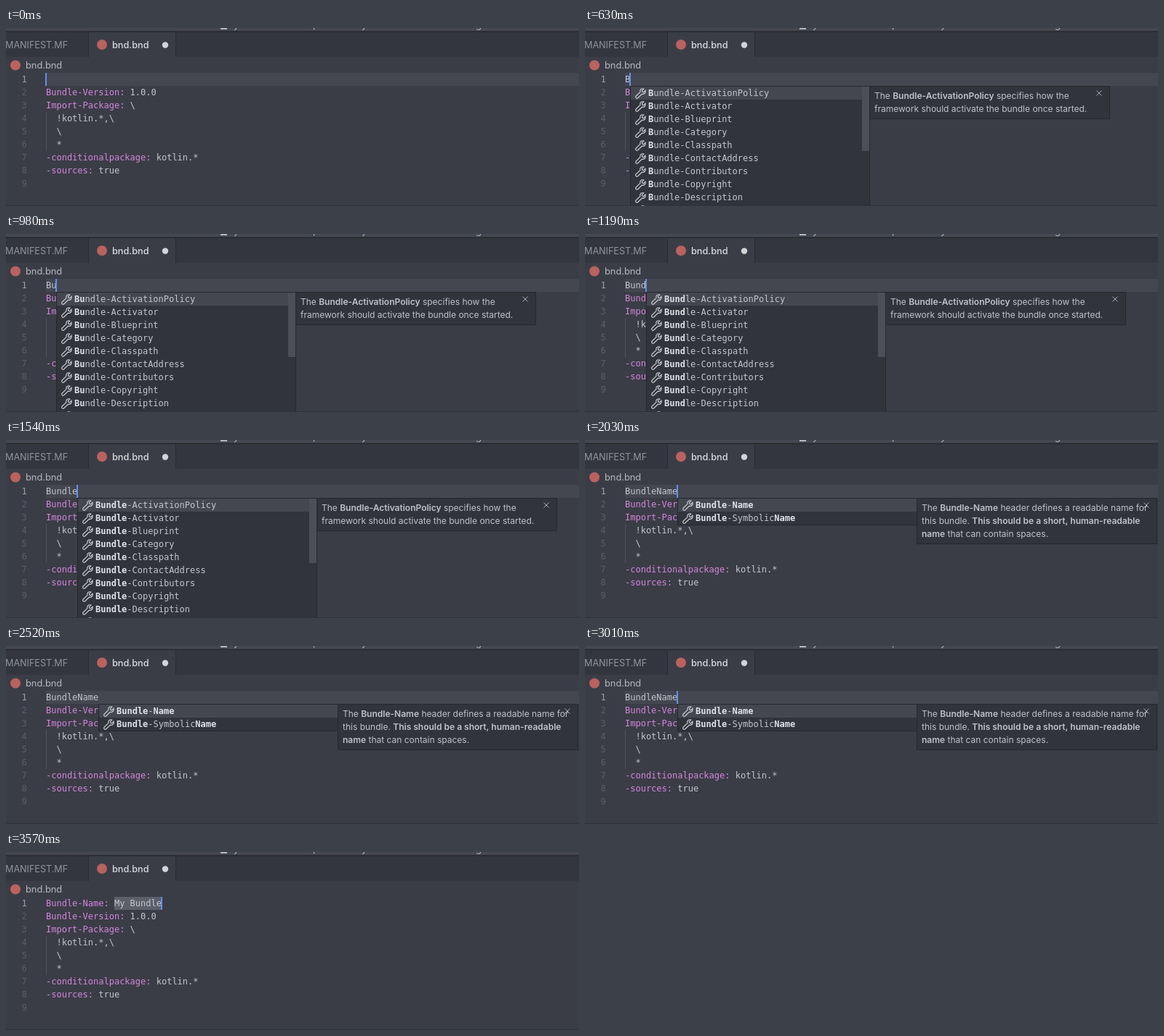
Animation of 788x246 px, one loop 3640 ms. Source, as an HTML page with a canvas:

```html
<!DOCTYPE html>
<html lang="en">
<head>
<meta charset="utf-8">
<title>Code completion</title>
<style>
html, body { margin: 0; height: 100%; overflow: hidden; background: #3b3d46; }
canvas { display: block; }
</style>
</head>
<body>
<canvas id="stage" width="788" height="246"></canvas>
<script>
const ctx = document.getElementById('stage').getContext('2d');
const LOOP = 3640, STEP = 70, ADVANCE = 7.224, LEFT = 55, ROW = 18;
const MONO = '12px "DejaVu Sans Mono", monospace';
const UI = 'Inter, Roboto, sans-serif';
const KEY = '#d486dd', TEXT = '#c3c6ce', BRIGHT = '#e0e2e7';

const WORD = 'BundleName';
const KEY_TIMES = [420, 700, 1050, 1190, 1260, 1400, 1680, 1820, 1890, 2030];
const POPUP_AT = 560, ACCEPT_AT = 3080, BLINK = 490;

const CODE = [
  ['Bundle-Version:', ' 1.0.0'],
  ['Import-Package:', ' \\'],
  ['', '  !kotlin.*,\\'],
  ['', '  \\'],
  ['', '  *'],
  ['-conditionalpackage:', ' kotlin.*'],
  ['-sources:', ' true']
];
const HEADERS = ['ActivationPolicy', 'Activator', 'Blueprint', 'Category', 'Classpath',
  'ContactAddress', 'Contributors', 'Copyright', 'Description', 'DocURL'];
const NAMES = ['Name', 'NativeCode', 'SymbolicName'];

// Odd pieces are bold.
const POLICY_DOC = [
  ['The ', 'Bundle-ActivationPolicy', ' specifies how the'],
  ['framework should activate the bundle once started.']
];
const NAME_DOC = [
  ['The ', 'Bundle-Name', ' header defines a readable name for'],
  ['this bundle. ', 'This should be a short, human-readable'],
  ['', 'name', ' that can contain spaces.']
];

const WRENCH = new Path2D('M-6 4.2L0-1.6C-1-4.6 1.5-7 4.8-6L2.4-3.4 3-1.8 4.6-1.2 7-3.7' +
  'C7.8-.5 5.4 2 2.4 1.2L-3.6 7C-5 8-7.4 5.8-6 4.2Z');

function rect(x, y, w, h, color) {
  ctx.fillStyle = color;
  ctx.fillRect(x, y, w, h);
}

function dot(x, y, r, color) {
  ctx.fillStyle = color;
  ctx.beginPath();
  ctx.arc(x, y, r, 0, 7);
  ctx.fill();
}

function text(str, x, y, color, font = MONO) {
  ctx.font = font;
  ctx.fillStyle = color;
  ctx.fillText(str, x, y);
  return x + ctx.measureText(str).width;
}

const column = n => LEFT + n * ADVANCE;

function drawFrame() {
  rect(0, 0, 788, 246, '#3b3d46');
  rect(0, 0, 788, 4, '#464851');
  rect(0, 4, 788, 2, '#2b2d34');
  rect(295, 0, 9, 2, '#b4b6bc');
  [['y', 313], ['p', 422], ['y', 489], ['g', 646]].forEach(([c, x]) =>
    text(c, x, 0, '#b4b6bc', '13px ' + UI));

  rect(0, 6, 788, 34, '#34363f');
  rect(114, 6, 119, 34, '#3b3d46');
  rect(113, 6, 1, 34, '#2b2d34');
  rect(233, 6, 1, 34, '#2b2d34');
  text('MANIFEST.MF', -1, 28, '#90939c', '12.6px ' + UI);
  dot(132, 23, 7, '#b9625f');
  text('bnd.bnd', 146, 28, '#d9dbe0', '500 12.7px ' + UI);
  dot(219, 23.5, 4.2, '#d2d4d9');
  dot(13, 51.5, 7, '#b9625f');
  text('bnd.bnd', 27, 56, '#b5b8c0', '12.8px ' + UI);
  rect(0, 245, 788, 1, '#30323a');
}

function drawCode() {
  for (let i = 1; i < 10; i++) {
    text(i, 21.5, 57 + ROW * i, i === 1 ? '#9b9ea8' : '#5b5e69');
  }
  rect(LEFT, 116, 1, 54, '#50535d');
  CODE.forEach(([key, value], i) => {
    const y = 93 + ROW * i;
    text(value, text(key, LEFT, y, KEY), y, TEXT);
  });
}

function drawItem(label, typed, x, y) {
  ctx.save();
  ctx.translate(x + 14, y + 9);
  ctx.strokeStyle = '#c9cbd1';
  ctx.lineWidth = 1.2;
  ctx.stroke(WRENCH);
  ctx.restore();

  const head = Math.min(typed.length, 6);
  const tail = typed.slice(6);
  const from = tail ? label.lastIndexOf(tail) : label.length;
  const base = y + 13;
  let pen = text(label.slice(0, head), x + 25, base, BRIGHT, 'bold ' + MONO);
  pen = text(label.slice(head, from), pen, base, TEXT);
  pen = text(label.slice(from, from + tail.length), pen, base, BRIGHT, 'bold ' + MONO);
  text(label.slice(from + tail.length), pen, base, TEXT);
}

function panel(x, y, w, h) {
  rect(x, y, w, h, '#26282e');
  rect(x + 1, y + 1, w - 2, h - 2, '#32343c');
}

function drawPopup(typed) {
  const x = Math.round(column(typed.length));
  const tail = typed.slice(6);
  const items = tail ? NAMES.filter(name => name.includes(tail)) : HEADERS;
  const doc = tail ? NAME_DOC : POLICY_DOC;

  panel(x, 80, 330, items.length * ROW + 2);
  rect(x + 1, 81, 328, ROW, '#454750');
  items.forEach((item, i) => drawItem('Bundle-' + item, typed, x, 81 + ROW * i));
  if (!tail) rect(x + 319, 81, 10, 89, '#4d4f58');

  panel(x + 329, 80, 331, doc.length * ROW + 10);
  doc.forEach((line, i) => {
    let pen = x + 336;
    line.forEach((part, j) => {
      pen = text(part, pen, 98 + ROW * i, '#bfc2ca', (j % 2 ? '600 ' : '') + '12px ' + UI);
    });
  });
  const cx = x + 645, cy = 90;
  ctx.strokeStyle = '#a9acb4';
  ctx.lineWidth = 1;
  ctx.beginPath();
  ctx.moveTo(cx - 3.5, cy - 3.5);
  ctx.lineTo(cx + 3.5, cy + 3.5);
  ctx.moveTo(cx + 3.5, cy - 3.5);
  ctx.lineTo(cx - 3.5, cy + 3.5);
  ctx.stroke();
}

function draw(now) {
  const t = Math.floor(now % LOOP / STEP) * STEP;
  const typed = WORD.slice(0, KEY_TIMES.filter(k => k <= t).length);
  const accepted = t >= ACCEPT_AT;

  drawFrame();
  if (!accepted) rect(LEFT, 62, 733, ROW, '#444650');
  drawCode();

  if (accepted) {
    rect(column(13), 62, 9 * ADVANCE, ROW, '#5d606a');
    text('My Bundle', column(13), 75, TEXT);
    text('Bundle-Name:', LEFT, 75, KEY);
  } else {
    text(typed, LEFT, 75, TEXT);
    if (t >= POPUP_AT) drawPopup(typed);
  }

  const lastKey = accepted ? ACCEPT_AT : Math.max(0, ...KEY_TIMES.filter(k => k <= t));
  if (t - lastKey <= BLINK - STEP || Math.floor((t - lastKey) / BLINK) % 2 === 0 || accepted) {
    rect(Math.round(column(accepted ? 22 : typed.length)) - 1, 62, 2, ROW, '#5e90ee');
  }
}

const start = performance.now();
function tick() {
  draw(performance.now() - start);
  requestAnimationFrame(tick);
}
tick();
</script>
</body>
</html>
```
